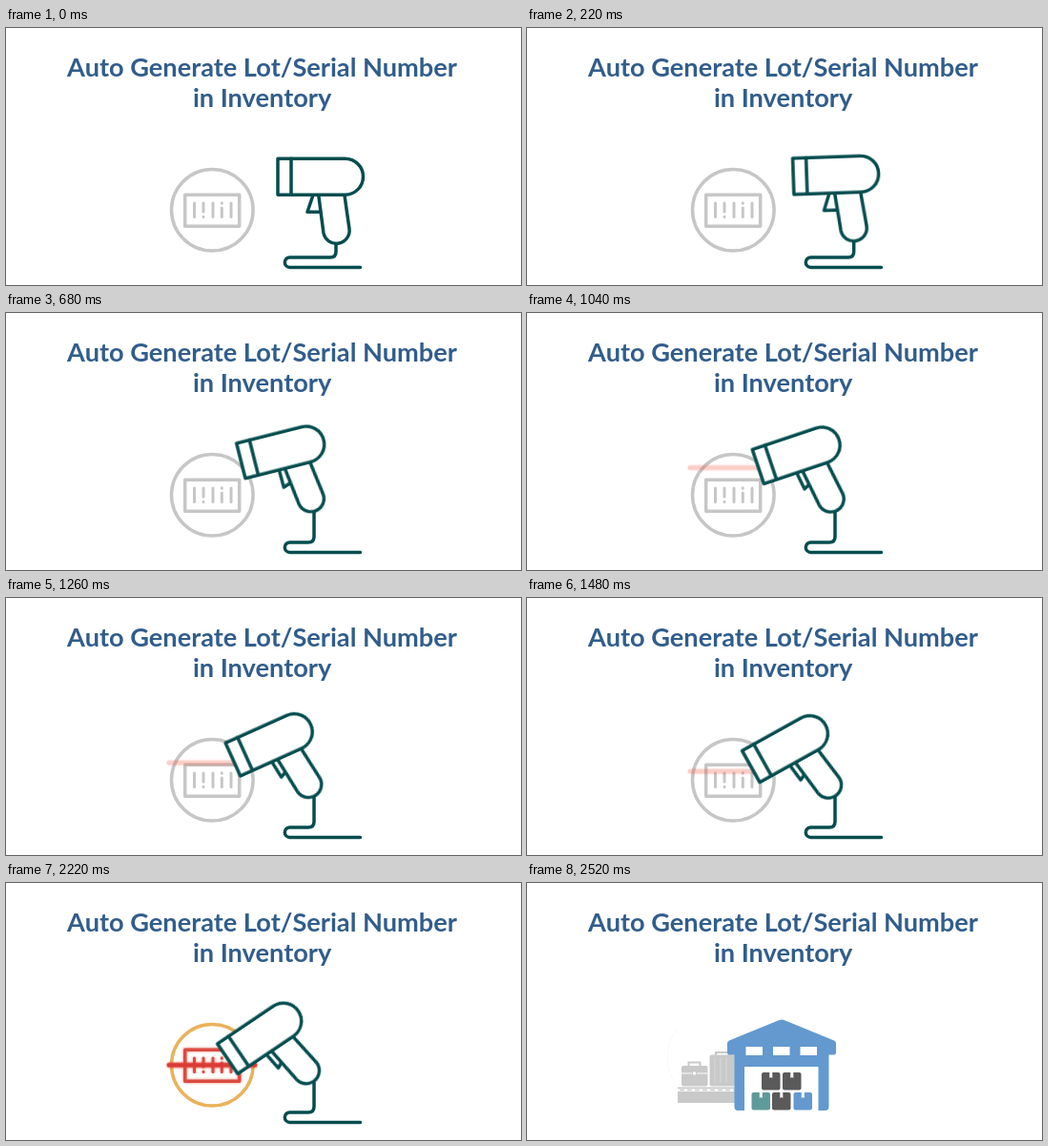
Animation of 540 by 270 pixels, one loop 3400 ms. Source, as an HTML page:

```html
<!DOCTYPE html>
<html lang="en">
<head>
<meta charset="utf-8">
<title>Auto Generate Lot/Serial Number</title>
<style>
  html, body { margin: 0; width: 100%; height: 100%; overflow: hidden; background: #fff; }
  svg { display: block; width: 540px; height: 270px; }
  svg {
    --approach: cubic-bezier(.6, 0, .6, 1);
    --scan: cubic-bezier(.4, 0, .38, 1);
  }

  .title { font: 700 27.2px Lato, sans-serif; fill: #315d8c; text-anchor: middle; }
  .line { fill: none; stroke: currentColor; stroke-width: 3.5; stroke-linecap: round; stroke-linejoin: round; }
  .tag { color: #c6c6c6; }
  .bars { stroke-width: 3; }
  .alert { color: #dc4b42; filter: drop-shadow(0 0 1.5px #f08a7c); }
  .ring { color: #e9b25b; transform-origin: 216.3px 191.2px; }
  .beam { color: #f0452f; stroke-width: 4.6; filter: drop-shadow(0 0 1px #f0452f); }
  .hot { color: #d93c35; }
  .gun { color: #054d4f; }
  .body { fill: #fff; }
  .turn { transform-origin: 346px 228px; }
  .trigger { transform-origin: 321.5px 177px; }

  .scene, .tag, .alert, .ring, .sweep, .beam, .hot, .cable, .move, .turn, .trigger, .store {
    animation: 3400ms linear infinite both;
  }
  .move { animation-name: move; animation-timing-function: var(--approach); }
  .aim { animation-name: aim; animation-timing-function: var(--approach); }
  .cable { animation-name: cable; animation-timing-function: var(--approach); }
  .tilt { animation-name: tilt; animation-timing-function: var(--scan); }
  .sweep { animation-name: sweep; animation-timing-function: var(--scan); }
  .trigger { animation-name: squeeze; }
  .beam { animation-name: beam; }
  .tag { animation-name: off; }
  .alert, .hot { animation-name: on; }
  .ring { animation-name: burst; }
  .scene { animation-name: leave; }
  .store { animation-name: arrive; }

  /* approach: 0 to 650 ms */
  @keyframes move {
    0% { transform: none; }
    19.12%, 100% { transform: translate(-23px, -18px); }
  }
  @keyframes aim {
    0% { transform: none; }
    19.12%, 100% { transform: rotate(-14deg); }
  }
  @keyframes cable {
    0% { d: path("M346 228V235Q346 241 340 241H297.5A5.2 5.2 0 0 0 297.5 251.4H371.5"); }
    19.12%, 100% { d: path("M323 210V235Q323 241 317 241H297.5A5.2 5.2 0 0 0 297.5 251.4H371.5"); }
  }
  @keyframes squeeze {
    0%, 17% { transform: none; }
    21%, 100% { transform: rotate(-26deg); }
  }

  /* scan: 600 to 2160 ms */
  @keyframes tilt {
    0%, 17.65% { transform: none; }
    63.53%, 100% { transform: rotate(-20deg); }
  }
  @keyframes sweep {
    0%, 17.65% { transform: translateY(154px); }
    63.53%, 100% { transform: translateY(191.3px); }
  }
  @keyframes beam {
    0%, 20.5% { opacity: 0; }
    25%, 100% { opacity: .27; }
  }

  /* hit: 2160 to 2220 ms */
  @keyframes on {
    0%, 63.53% { opacity: 0; }
    65.29%, 100% { opacity: 1; }
  }
  @keyframes off {
    0%, 63.53% { opacity: 1; }
    65.29%, 100% { opacity: 0; }
  }

  /* change of scene: 2240 to 2520 ms */
  @keyframes burst {
    0%, 63.53% { opacity: 0; transform: none; }
    65.29%, 65.88% { opacity: 1; transform: none; }
    74.12%, 100% { opacity: 0; transform: scale(1.5); }
  }
  @keyframes leave {
    0%, 65.88% { opacity: 1; }
    73.5%, 100% { opacity: 0; }
  }
  @keyframes arrive {
    0%, 66.5% { opacity: 0; }
    74.12%, 100% { opacity: 1; }
  }
</style>
</head>
<body>
<svg viewBox="0 0 540 270">
  <defs>
    <g id="code" class="line">
      <rect x="187.7" y="175.2" width="57" height="33"/>
      <path class="bars" d="M197.5 184V198.5M207 184V193M207 198.2V198.6M217 184V198.5M226.3 183.8V184.2M226.3 189V198.5M236 184V198.5"/>
    </g>
    <path id="box" d="M2 0H8.300V6L9.800 5L11.300 6V0H17.500Q19.500 0 19.500 2V16.500Q19.500 18.500 17.500 18.500H2Q0 18.500 0 16.500V2Q0 0 2 0Z"/>
  </defs>

  <text class="title" x="268.5" y="51">Auto Generate Lot/Serial Number</text>
  <text class="title" x="268.6" y="83">in Inventory</text>

  <g class="scene">
    <g class="tag">
      <circle class="line" cx="216.3" cy="191.2" r="42.8"/>
      <use href="#code"/>
    </g>
    <circle class="line ring" cx="216.3" cy="191.2" r="42.8"/>
    <use href="#code" class="alert"/>
    <g class="sweep">
      <path class="line beam" d="M171 0H261"/>
      <path class="line beam hot" d="M171 0H261"/>
    </g>

    <g class="gun">
      <path class="line cable" d="M346 228V235Q346 241 340 241H297.5A5.2 5.2 0 0 0 297.5 251.4H371.5"/>
      <g class="move"><g class="turn aim"><g class="turn tilt">
        <path class="line body trigger" d="M321.5 177L316 193.2H329.6"/>
        <path class="line body" d="M327.8 176L332.9 215A13.7 13.7 0 0 0 360 211L355 176"/>
        <path class="line body" d="M285 137.2H355.500A19 19 0 0 1 355.500 175.200H285Z"/>
        <path class="line" d="M299 137.2V175.2"/>
      </g></g></g>
    </g>
  </g>

  <g class="store">
    <path d="M158 151Q139 180 153 207" fill="none" stroke="#f8f8f8"/>
    <g fill="#c9c9c9">
      <path d="M158 214.500H218V216.200H158ZM158 219H218V231H158Z"/>
      <rect x="162" y="192" width="27.500" height="21.500" rx="2"/>
      <rect x="191.500" y="180.500" width="27" height="33" rx="2"/>
    </g>
    <g fill="none" stroke="#c9c9c9" stroke-width="2">
      <path d="M169.500 192V188.500H181.500V192M198 181V178H212V181"/>
      <path d="M160 217.600H218" stroke-width="1.5" stroke-dasharray="5 3"/>
      <path d="M162 200H173M178 200H189.500" stroke="#fff" stroke-width="1"/>
      <path d="M197 184V210M203 184V210M209 184V210" stroke="#d8d8d8" stroke-width="1"/>
    </g>
    <rect x="174" y="198.500" width="3" height="3" fill="#fff"/>
    <g fill="#6399cf">
      <path d="M264.500 144Q267 143 269.500 144L322 165.500Q324 166.500 324 168.500V178Q324 180.500 321.500 180.500H316.500V235Q316.500 239 312.500 239H305.500V193H228V239H221Q217.500 239 217.500 235V180.500H212.500Q210 180.500 210 178V168.500Q210 166.500 212 165.500Z"/>
      <use href="#box" x="279.500" y="220"/>
    </g>
    <path fill="#fff" d="M229.500 172H247V181H229.500ZM258 172H275.500V181H258ZM286.500 172H304V181H286.500Z"/>
    <g fill="#5a5a5a">
      <use href="#box" x="246" y="199"/>
      <use href="#box" x="268" y="199"/>
      <use href="#box" x="257" y="220"/>
    </g>
    <use href="#box" x="235.500" y="220" fill="#5f9a9b"/>
  </g>
</svg>
</body>
</html>
```
